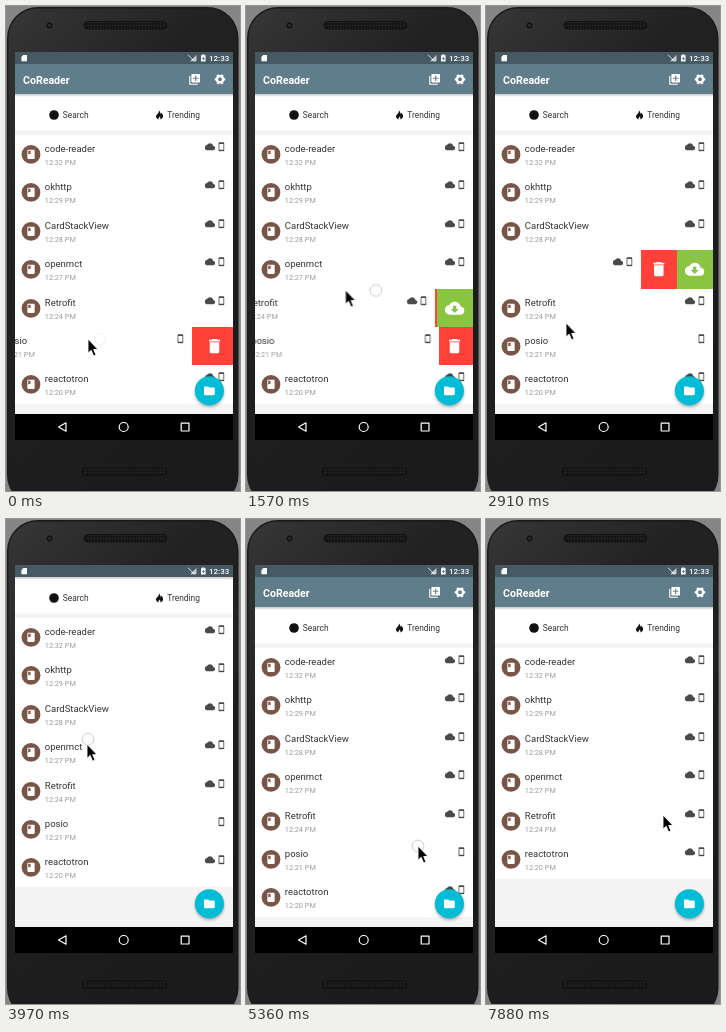
An HTML page that plays this animation: 234 px wide and 485 px high, repeating every 8 s.

```html
<!DOCTYPE html>
<html lang="en">
<head>
<meta charset="utf-8">
<title>Reader list</title>
<style>
html, body { margin: 0; width: 100%; height: 100%; overflow: hidden; background: #858585; }
svg { display: block; width: 234px; height: 485px; }
text { font-family: Roboto, sans-serif; }
rect.flat { shape-rendering: crispEdges; }
.name { font-size: 9.5px; fill: #333; }
.time { font-size: 7.3px; fill: #9a9a9a; }
.tab { font-size: 8.4px; fill: #333; }

.scroll, .slide, .row, #pointer, #touch { animation: 8s linear infinite; }
.scroll { animation-name: scroll; }
.openmct .slide { animation-name: swipe-openmct; }
.Retrofit .slide { animation-name: swipe-retrofit; }
.posio .slide { animation-name: swipe-posio; }
.posio { animation-name: remove; }
.reactotron { animation-name: lift; }
#pointer { animation-name: pointer; }
#touch { animation-name: touch, press; }

@keyframes scroll {
  0%, 42.3% { transform: translateY(0); }
  44.5%, 52.5% { transform: translateY(-30px); }
  56.1%, 100% { transform: translateY(0); }
}
@keyframes swipe-posio {
  0%, .75% { transform: translateX(-41px); }
  3%, 18.5% { transform: translateX(-36px); }
  19.6% { transform: translateX(-34px); }
  23%, 68.5% { transform: translateX(0); }
  73.5% { transform: translateX(-40px); }
  75.5%, 100% { transform: translateX(-36px); }
}
@keyframes swipe-retrofit {
  0%, 18.4% { transform: translateX(0); }
  19.6% { transform: translateX(-37px); }
  21.1%, 27.5% { transform: translateX(-72px); }
  31%, 100% { transform: translateX(0); }
}
@keyframes swipe-openmct {
  0%, 27.3% { transform: translateX(0); }
  30.6% { transform: translateX(-75px); }
  32%, 42.3% { transform: translateX(-72px); }
  45.5%, 100% { transform: translateX(0); }
}
@keyframes remove {
  0%, 82.4% { visibility: visible; }
  82.5%, 100% { visibility: hidden; }
}
@keyframes lift {
  0%, 83.2% { transform: translateY(0); }
  84% { transform: translateY(-1.6px); }
  85.5% { transform: translateY(-17px); }
  88%, 100% { transform: translateY(-38px); }
}
@keyframes pointer {
  0%, .75% { transform: translate(82px, 333px); }
  2.5% { transform: translate(78px, 334px); }
  10.25%, 11.75% { transform: translate(225px, 338px); }
  17.5% { transform: translate(170px, 285px); }
  19.6% { transform: translate(100px, 284px); }
  21.1%, 21.9% { transform: translate(76px, 285px); }
  26.9% { transform: translate(165px, 257px); }
  30.6% { transform: translate(82px, 262px); }
  32% { transform: translate(80px, 264px); }
  36.4% { transform: translate(80px, 317px); }
  40%, 42.25% { transform: translate(79px, 349px); }
  46.5% { transform: translate(82px, 212px); }
  49.6% { transform: translate(81px, 225px); }
  52.5% { transform: translate(81px, 236px); }
  56.1%, 58.25% { transform: translate(78px, 344px); }
  62.5% { transform: translate(125px, 313px); }
  67%, 68.5% { transform: translate(172px, 327px); }
  73.75% { transform: translate(85px, 331px); }
  78.1%, 84% { transform: translate(208px, 338px); }
  90.6% { transform: translate(80px, 345px); }
  91.25%, 94.25% { transform: translate(65px, 345px); }
  98.5%, 100% { transform: translate(177px, 296px); }
}
@keyframes touch {
  0%, .75% { transform: translate(94px, 333px); }
  2.5% { transform: translate(83px, 334px); }
  17.8% { transform: translate(170px, 284px); }
  19.6% { transform: translate(131px, 284.5px); }
  21.2% { transform: translate(86px, 284px); }
  27.2% { transform: translate(165px, 257px); }
  31.2% { transform: translate(85px, 262px); }
  42.3% { transform: translate(79px, 349px); }
  47.3% { transform: translate(82px, 213px); }
  49.6% { transform: translate(82px, 220px); }
  52.5% { transform: translate(81px, 232px); }
  56.1% { transform: translate(79px, 338px); }
  66%, 68.8% { transform: translate(172px, 327px); }
  74.3%, 100% { transform: translate(88px, 332px); }
}
@keyframes press {
  0%, .75% { opacity: .3; }
  2.5%, 17.7% { opacity: 0; }
  17.8%, 21.2% { opacity: 1; }
  21.3%, 27.1% { opacity: 0; }
  27.2%, 31.2% { opacity: 1; }
  31.3%, 42.2% { opacity: 0; }
  42.3%, 56% { opacity: 1; }
  56.1%, 66.5% { opacity: 0; }
  66.6%, 74.2% { opacity: 1; }
  74.3%, 100% { opacity: 0; }
}
</style>
</head>
<body>
<svg viewBox="0 0 234 485">
  <defs>
    <clipPath id="screen"><path d="M9 46H227V434H9Z"/></clipPath>
    <linearGradient id="body" x2=".5" y2="1">
      <stop stop-color="#363636"/><stop offset=".35" stop-color="#222"/><stop offset="1" stop-color="#1b1b1c"/>
    </linearGradient>
    <linearGradient id="shade" x2="0" y2="1">
      <stop stop-opacity=".22"/><stop offset="1" stop-opacity="0"/>
    </linearGradient>
    <filter id="soft" x="-30%" y="-30%" width="160%" height="160%"><feGaussianBlur stdDeviation="1.5"/></filter>
    <pattern id="mesh" width="3" height="3" patternUnits="userSpaceOnUse">
      <path d="M0 0H3V3H0Z" fill="#151515"/><circle cx="1.5" cy="1.5" r=".8" fill="#2c2c2c"/>
    </pattern>
    <symbol id="cloud" viewBox="0 0 24 24"><path d="M19.35 10.04C18.67 6.59 15.64 4 12 4 9.11 4 6.6 5.64 5.35 8.04 2.34 8.36 0 10.91 0 14c0 3.31 2.69 6 6 6h13c2.76 0 5-2.24 5-5 0-2.64-2.05-4.78-4.65-4.96z"/></symbol>
    <symbol id="arrow" viewBox="0 0 24 24"><path d="M17 13l-5 5-5-5h3V9h4v4z"/></symbol>
    <symbol id="mobile" viewBox="0 0 24 24"><path d="M17 1H7c-1.1 0-2 .9-2 2v18c0 1.1.9 2 2 2h10c1.1 0 2-.9 2-2V3c0-1.1-.9-2-2-2zM17 19H7V5h10z"/></symbol>
    <symbol id="trash" viewBox="0 0 24 24"><path d="M6 19c0 1.1.9 2 2 2h8c1.1 0 2-.9 2-2V7H6zM19 4h-3.5l-1-1h-5l-1 1H5v2h14z"/></symbol>
    <symbol id="folder" viewBox="0 0 24 24"><path d="M10 4H4c-1.1 0-2 .9-2 2v12c0 1.1.9 2 2 2h16c1.1 0 2-.9 2-2V8c0-1.1-.9-2-2-2h-8z"/></symbol>
    <symbol id="book" viewBox="0 0 24 24"><path d="M18 2H6c-1.1 0-2 .9-2 2v16c0 1.1.9 2 2 2h12c1.1 0 2-.9 2-2V4c0-1.1-.9-2-2-2zM6 4h5v8l-2.5-1.5L6 12z"/></symbol>
    <symbol id="add" viewBox="0 0 24 24"><path d="M4 6H2v14c0 1.1.9 2 2 2h14v-2H4zm16-4H8c-1.1 0-2 .9-2 2v12c0 1.1.9 2 2 2h12c1.1 0 2-.9 2-2V4c0-1.1-.9-2-2-2zm-1 9h-4v4h-2v-4H9V9h4V5h2v4h4z"/></symbol>
  </defs>

  <!-- handset -->
  <rect x="1" y="1" width="231.5" height="499" rx="31" fill="#191919"/>
  <rect x="2.5" y="2.5" width="228.5" height="496" rx="29" fill="url(#body)"/>
  <rect x="78" y="15.5" width="83" height="7.5" rx="3.7" fill="url(#mesh)" stroke="#111"/>
  <rect x="76" y="462" width="85" height="7.5" rx="3.7" fill="url(#mesh)" stroke="#111"/>
  <circle cx="43.5" cy="19.5" r="3.8" fill="#131313" stroke="#3a3a3a"/>
  <circle cx="43.5" cy="19.5" r="1.5" fill="#27303f"/>

  <g clip-path="url(#screen)">
    <path d="M9 46H227V434H9Z" fill="#f4f4f4"/>
    <g class="scroll">
      <path d="M9 88H227V124.5H9Z" fill="#fff"/>
      <path d="M9 88H227V91H9Z" fill="url(#shade)"/>
      <path d="M9 58H227V88H9Z" fill="#607d8b"/>
      <text x="17" y="77.5" font-size="10.6" font-weight="700" fill="#fff">CoReader</text>
      <use href="#add" x="182.1" y="66.8" width="13" height="13" fill="#fff"/>
      <g fill="none" stroke="#fff">
        <circle cx="214" cy="73.3" r="3.1" stroke-width="2.3"/>
        <circle cx="214" cy="73.3" r="4.5" stroke-width="1.6" pathLength="12" stroke-dasharray="1" stroke-dashoffset=".5"/>
      </g>
      <circle cx="48" cy="109" r="4.8" fill="#111"/>
      <text class="tab" x="56.8" y="112">Search</text>
      <path transform="translate(23.2 16.4) scale(.85)" d="M152.6 103.7C154.3 105 154 106.3 154.6 107.5C155.4 107.2 155.6 106.5 155.5 105.9C157.5 108 158.3 111 156.6 112.9C155.7 113.9 154.5 114.2 153.8 114.2C155 112.8 154.3 111.5 153.3 110.6C153.2 111.6 152.2 111.8 152.1 112.6C152 113.3 152.3 113.8 152.7 114.2C150.6 114 149.2 112.6 149.2 110.8C149.2 108.2 153.1 107.4 152.6 103.7Z" fill="#111"/>
      <text class="tab" x="161.3" y="112">Trending</text>
      <g id="list"></g>
    </g>

    <path d="M9 46H227V58H9Z" fill="#455a64"/>
    <g fill="#fff">
      <path d="M17.3 49H21V55.2H15.4V51Z"/>
      <path d="M184 55.3L190.5 49V55.3Z" opacity=".7"/>
      <path d="M182 48.8L188.6 55.4" stroke="#fff" stroke-width=".8"/>
      <path d="M195 49.3H196.2V48.4H198.4V49.3H199.6V55.5H195Z"/>
      <path d="M197.7 50.2L196 53H197.2V54.8L198.8 52H197.6Z" fill="#455a64"/>
      <text x="203" y="55" font-size="8" font-weight="500">12:33</text>
    </g>

    <circle cx="203.5" cy="386.5" r="14.6" opacity=".3" filter="url(#soft)"/>
    <circle cx="203.4" cy="384.8" r="14.6" fill="#00bcd4"/>
    <use href="#folder" x="196.9" y="378.3" width="13" height="13" fill="#fff"/>

    <path d="M9 408H227V434H9Z"/>
    <g fill="none" stroke="#fff" stroke-width="1.2" stroke-linejoin="round">
      <path d="M60 416.8V425.2L52.5 421Z"/>
      <circle cx="117.7" cy="421" r="4.5"/>
      <path d="M175.2 417.2H183V425H175.2Z"/>
    </g>
  </g>

  <circle id="touch" r="5.9" fill="#fff" fill-opacity=".35" stroke="#c3c3e6" stroke-width=".9"/>
  <path id="pointer" d="M0 0V14.2L3.2 11.3L5.6 17L8 16L5.7 10.5H10Z" stroke="#fff" stroke-width=".9"/>
</svg>

<script>
const pitch = 38.4;
const rows = [
  ["code-reader", "12:32 PM"],
  ["okhttp", "12:29 PM"],
  ["CardStackView", "12:28 PM"],
  ["openmct", "12:27 PM"],
  ["Retrofit", "12:24 PM"],
  ["posio", "12:21 PM"],
  ["reactotron", "12:20 PM"]
];

const icon = (id, cx, cy, size, fill) =>
  `<use href="#${id}" x="${cx - size / 2}" y="${cy - size / 2}" width="${size}" height="${size}" fill="${fill}"/>`;

const panel = (x, height, fill) =>
  `<rect class="flat" x="${x}" width="${227 - x}" height="${height}" fill="${fill}"/>`;

// Buttons stay put while the row slides off them.
function actions(local, height) {
  const mid = pitch / 2;
  const remove = panel(140, height, "#ff4139") + icon("trash", local ? 208.5 : 172.8, mid, 19, "#fff");
  if (local) return remove;
  return remove + panel(191, height, "#89c540") +
    icon("cloud", 208.7, mid, 19.5, "#fff") + icon("arrow", 208.7, mid, 19.5, "#89c540");
}

function row([name, time], i) {
  // Whole-pixel edges keep the buttons from showing between closed rows.
  const top = Math.round(129 + i * pitch);
  const height = Math.round(129 + (i + 1) * pitch) - top;
  const local = name === "posio";
  const swipes = ["openmct", "Retrofit", "posio"].includes(name);
  return `<g transform="translate(0 ${top})"><g class="row ${name}">
    ${swipes ? actions(local, height) : ""}
    <g class="slide">
      ${panel(9, height, "#fff")}
      <circle cx="25" cy="19.4" r="9.4" fill="#795548"/>
      ${icon("book", 25, 19.4, 11, "#fff")}
      <text class="name" x="38.8" y="17.2">${name}</text>
      <text class="time" x="38.8" y="30">${time}</text>
      ${local ? "" : icon("cloud", 204, 11.8, 10.5, "#4a4a4a")}
      ${icon("mobile", 215.4, 11.8, 9.7, "#4a4a4a")}
    </g></g></g>`;
}

document.getElementById("list").innerHTML = rows.map(row).join("");
</script>
</body>
</html>
```
